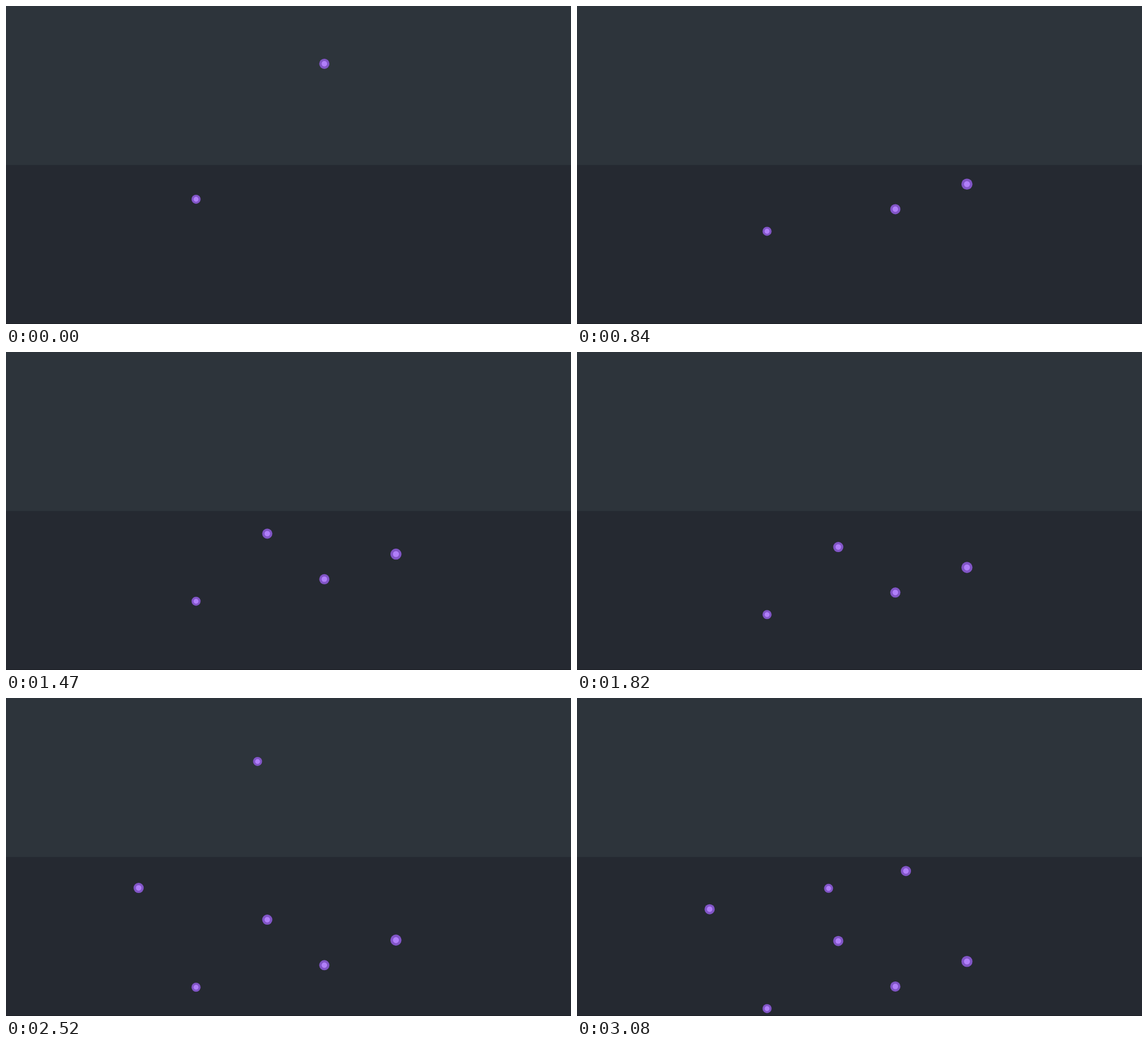
Animation of 998x561 px, one loop 3.15 s. Source, as an HTML page with a canvas:

```html
<!DOCTYPE html>
<html>
<head>
<meta charset="utf-8">
<title>Balls sinking in water</title>
<style>
  html, body { margin: 0; width: 100%; height: 100%; overflow: hidden; background: #2d343b; }
  canvas { display: block; }
</style>
</head>
<body>
<canvas id="stage" width="998" height="561"></canvas>
<script>
const ctx = document.getElementById('stage').getContext('2d');
const W = 998, H = 561, LOOP = 3150, STEP = 70;
const WATER = H / 2;
const TOP = 28, SHOWN = 54;   // every ball falls from TOP and shows below SHOWN
const GRAVITY = 0.0053;       // px per ms²
const SINK = 0.0672;          // settled speed in water, px per ms
const FALL = Math.sqrt(2 * (WATER - TOP) / GRAVITY);

// plunge: how far the entry speed carries the ball below the surface
const ball = (x, r, release, plunge) => ({ x, r, release, plunge });
const balls = [
  ball(335.7, 8, -769, 29.5),
  ball(562.3, 9, -167, 31),
  ball(688.8, 9.8, 394, 24.5),
  ball(461.5, 9, 990, 28.5),
  ball(234.3, 9, 1958, 37.5),
  ball(444.4, 8, 2342, 26.5),
  ball(581, 9, 2737, 25.5)
];

// Free fall, then the entry speed decays to the steady sinking speed
function height(age, plunge) {
  if (age < FALL) return TOP + GRAVITY * age ** 2 / 2;
  const wet = age - FALL;
  const decay = plunge / (GRAVITY * FALL - SINK);
  return WATER + SINK * wet + plunge * (1 - Math.exp(-wet / decay));
}

function rect(x, y, w, h, color) {
  ctx.fillStyle = color;
  ctx.fillRect(x, y, w, h);
}

function disc(x, y, r, color) {
  ctx.fillStyle = color;
  ctx.beginPath();
  ctx.arc(x, y, r, 0, 2 * Math.PI);
  ctx.fill();
}

function draw(t) {
  rect(0, 0, W, H, '#2d343b');
  rect(0, WATER, W, H - WATER, '#252931');
  rect(0, H - 1, W, 1, '#1b1e25');
  for (const { x, r, release, plunge } of balls) {
    if (t < release) continue;
    const y = height(t - release, plunge);
    if (y < SHOWN) continue;
    disc(x, y, r, '#8155c6');
    disc(x, y, r * 0.54, '#b17ffa');
  }
}

const began = performance.now();
function tick() {
  const t = (performance.now() - began) % LOOP;
  draw(Math.floor(t / STEP) * STEP);
  requestAnimationFrame(tick);
}
tick();
</script>
</body>
</html>
```
